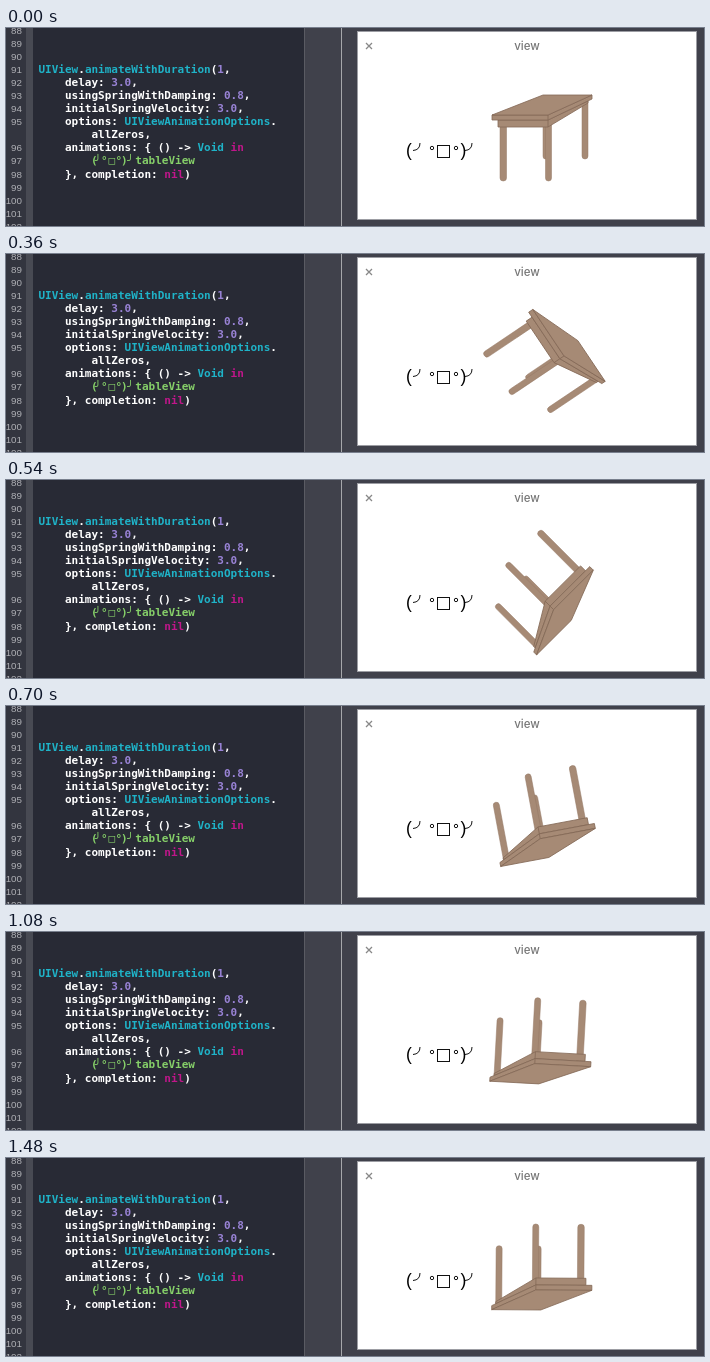
An HTML page that plays this animation: 698 px wide and 198 px high, repeating every 1940 ms.

```html
<!DOCTYPE html>
<html lang="en">
<head>
<meta charset="utf-8">
<style>
html, body { margin: 0; width: 100%; height: 100%; overflow: hidden; background: #40414b; }
svg { display: block; }
text { white-space: pre; }
.code { font: bold 11px "DejaVu Sans Mono", monospace; fill: #fff; }
.line { font: 9.8px "Liberation Sans", sans-serif; fill: #b0b1b6; text-anchor: end; }
.t { fill: #1fb3c8; }
.n { fill: #9983d6; }
.k { fill: #c0168a; }
.g { fill: #86d069; }
.title { font: 500 11.5px Inter, sans-serif; fill: #777; text-anchor: middle; }
.face { font: 17.5px "Liberation Sans", sans-serif; }
.table { fill: #a68a75; stroke: #846957; stroke-width: .8; stroke-linejoin: round; }
.legs { stroke: #957965; stroke-width: .5; }
</style>
</head>
<body>
<svg width="698" height="198" viewBox="0 0 698 198">
  <rect width="698" height="198" fill="#40414b"/>
  <rect width="298" height="198" fill="#282a35"/>
  <rect width="20" height="198" fill="#33353f"/>
  <rect x="20" width="7" height="198" fill="#484a53"/>
  <rect x="298" width="1" height="198" fill="#5a5b63"/>
  <rect x="335" width="1" height="198" fill="#a6a7ab"/>
  <g id="code"></g>

  <rect x="351.5" y="3.5" width="339" height="188" fill="#fff" stroke="#9c9da3"/>
  <path d="M360 15l6 6m0-6l-6 6" stroke="#888" stroke-width="1.3"/>
  <text class="title" x="521" y="22">view</text>

  <text class="face" y="128" x="400 454.5">()</text>
  <g fill="none" stroke="#111">
    <path id="hand" d="M414 115q0 7-7 7.5"/>
    <use href="#hand" x="52"/>
    <circle cx="426" cy="120" r="1.7"/>
    <circle cx="450" cy="120" r="1.7"/>
    <rect x="431.5" y="117.5" width="12" height="12"/>
  </g>

  <g id="table" class="table">
    <g id="legs" class="legs"></g>
    <path d="M492 92H542L582 73V75L542 99H492Z"/>
    <path d="M542 92V99"/>
    <path d="M486 87H542L586 67V71L542 92H486Z"/>
    <path d="M486 87L537 67H586L542 87Z"/>
    <path d="M542 87V92"/>
  </g>
</svg>
<script>
const $ = id => document.getElementById(id);
const rowY = r => Math.floor(6.05 + 13.09 * r);
const span = (c, s) => `<tspan class="${c}">${s}</tspan>`;
const t = s => span('t', s), n = s => span('n', s), k = s => span('k', s);

// [row, indent, content]
const lines = [
  [3, 0, t('UIView') + '.' + t('animateWithDuration') + `(${n(1)},`],
  [4, 4, `delay: ${n('3.0')},`],
  [5, 4, `usingSpringWithDamping: ${n('0.8')},`],
  [6, 4, `initialSpringVelocity: ${n('3.0')},`],
  [7, 4, `options: ${t('UIViewAnimationOptions')}.`],
  [8, 8, 'allZeros,'],
  [9, 4, `animations: { () -&gt; ${t('Void')} ${k('in')}`],
  [11, 4, `}, completion: ${k('nil')})`]
];
let code = lines.map(([r, col, s]) =>
  `<text class="code" x="${32.5 + col * 6.62}" y="${rowY(r)}">${s}</text>`).join('');
code += `<text class="code g" y="${rowY(10)}" x="85 88.5 95 102.5 109.5 115 121 129.3">(╯°□°)╯tableView</text>`;

// The wrapped row 8 carries no line number
for (let r = 0; r < 16; r++)
  if (r !== 8) code += `<text class="line" x="16" y="${rowY(r)}">${88 + r - (r > 8)}</text>`;
$('code').innerHTML = code;

// [x, top, width, bottom]
const legs = [[537, 92, 4.5, 131], [576, 72, 6, 131], [494, 92, 6.5, 153], [539.5, 92, 6, 153]];
$('legs').innerHTML = legs.map(([x, y, w, end]) =>
  `<path d="M${x} ${y}V${end - 3}q0 3 ${w / 2} 3t${w / 2}-3V${y}Z"/>`).join('');

const LOOP = 1940, START = 260, END = 1490;

// Spring with damping 0.8 and initial velocity 3
function spring(s) {
  const w = 6, z = 0.8, wd = w * Math.sqrt(1 - z * z), b = (z * w - 3) / wd;
  return 1 - Math.exp(-z * w * s) * (Math.cos(wd * s) + b * Math.sin(wd * s));
}

function draw(now) {
  const ms = Math.floor(now % LOOP / 20) * 20;
  const p = ms < START ? 0 : ms > END ? 1 : spring((ms - START) / 1000);
  $('table').setAttribute('transform', `rotate(${180 * p} 536 109.5)`);
  requestAnimationFrame(draw);
}
draw(performance.now());
</script>
</body>
</html>
```
